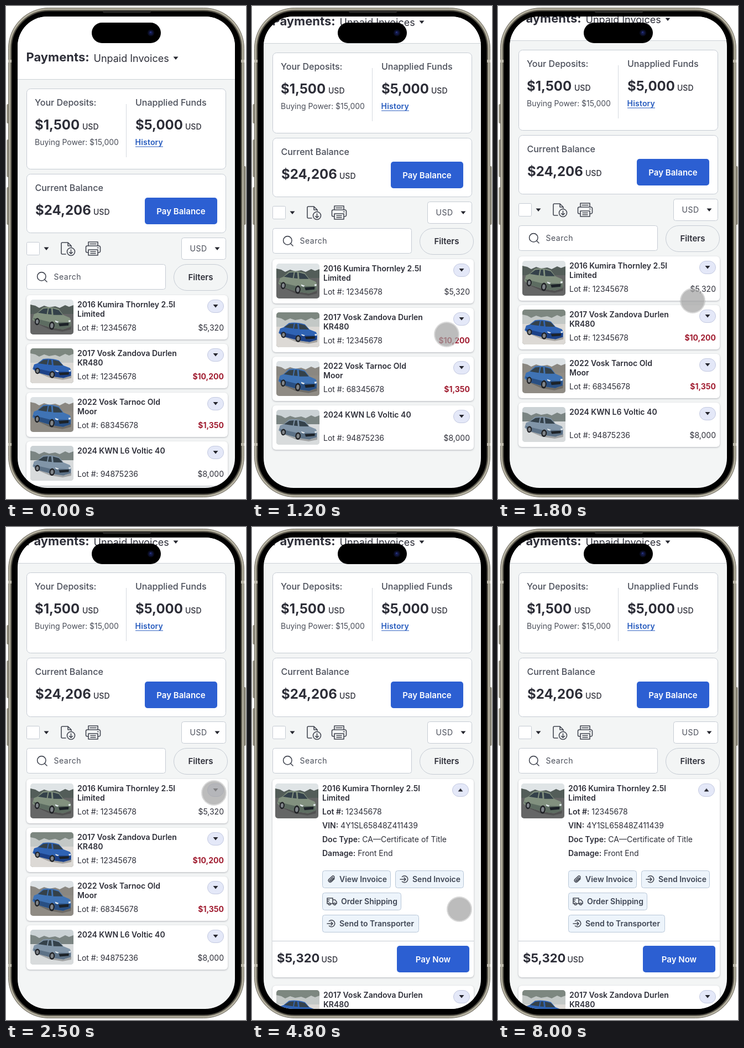
These frames come from a looping animation (434x890 px, 8.2 s). An HTML page:

```html
<!DOCTYPE html>
<html lang="en">
<head>
<meta charset="utf-8">
<title>Payments</title>
<style>
html, body { margin: 0; width: 100%; height: 100%; overflow: hidden; background: #fff; }
svg { display: block; }
text { font: 400 14px Inter, Roboto, sans-serif; fill: #2d2e38; white-space: pre; }
.label { font-size: 16px; font-weight: 500; fill: #4a4e59; }
.big { font-size: 24px; font-weight: 700; }
.total { font-size: 22px; font-weight: 700; }
.usd { font-weight: 500; }
.soft { fill: #4a4e59; }
.spaced { fill: #4a4e59; letter-spacing: .5px; }
.semi { font-weight: 600; }
.chip { font-weight: 600; fill: #3f4654; }
.due { font-weight: 700; fill: #a01c30; }
.btn { font-size: 15px; font-weight: 600; text-anchor: middle; }
.white { fill: #fff; }
.end { text-anchor: end; }
.panel { fill: #fff; stroke: #c5cbd3; }
.card { fill: #fff; filter: drop-shadow(0 1px 1.5px rgba(40, 45, 60, .32)); }
.icon { fill: none; stroke: #434752; stroke-width: 1.6; stroke-linecap: round; stroke-linejoin: round; }
.tri { fill: #25262e; }

.scroll, .cursor, .below, .head, .flip, .grow, .hide, .show {
  animation: 8200ms linear infinite;
}
.scroll { animation-name: scroll; }
.cursor { animation-name: move, fade; }
.below { animation-name: below; }
.head { animation-name: head; }
.grow { animation-name: grow; }
.hide { animation-name: hide; }
.show { animation-name: show; }
.flip { animation-name: flip; transform-box: fill-box; transform-origin: center; }

@keyframes scroll {
  0%, 3.6% { transform: translateY(0); animation-timing-function: ease-in-out; }
  14.63% { transform: translateY(-65px); }
  17.07%, 18.9% { transform: translateY(-67px); }
  21.95% { transform: translateY(-70px); animation-timing-function: ease-in-out; }
  29.27%, 100% { transform: translateY(-67px); }
}
@keyframes move {
  0%, 3.6% { transform: translate(352px, 658px); animation-timing-function: ease-in-out; }
  14.63% { transform: translate(352px, 593px); }
  17.07%, 18.9% { transform: translate(352px, 578px); }
  21.95% { transform: translate(352px, 532px); animation-timing-function: ease-in-out; }
  29.27% { transform: translate(376px, 483px); }
  30.49% { transform: translate(376px, 480px); }
  46.95% { transform: translate(375px, 480px); animation-timing-function: ease-in-out; }
  53.66%, 67.07% { transform: translate(375px, 690px); animation-timing-function: ease-in-out; }
  70.73%, 100% { transform: translate(375px, 780px); }
}
@keyframes fade {
  0%, .6% { opacity: 0; }
  3%, 89.3% { opacity: 1; }
  91.5%, 100% { opacity: 0; }
}
@keyframes below {
  0%, 31.8% { transform: translateY(0); animation-timing-function: ease-in-out; }
  37.8%, 100% { transform: translateY(285px); }
}
@keyframes head {
  0%, 31.8% { transform: translateX(0); animation-timing-function: ease-in-out; }
  37.8%, 100% { transform: translateX(-2px); }
}
@keyframes grow {
  0%, 31.8% { height: 80px; animation-timing-function: ease-in-out; }
  37.8%, 100% { height: 358px; }
}
@keyframes flip {
  0%, 31.8% { transform: rotate(0); }
  37.8%, 100% { transform: rotate(180deg); }
}
@keyframes hide {
  0%, 31.8% { opacity: 1; }
  35%, 100% { opacity: 0; }
}
@keyframes show {
  0%, 31.8% { opacity: 0; }
  37%, 100% { opacity: 1; }
}
</style>
</head>
<body>
<script>
const text = (x, y, cls, s) => `<text x="${x}" y="${y}" class="${cls}">${s}</text>`;
const rect = (x, y, w, h, r, attrs) =>
  `<rect x="${x}" y="${y}" width="${w}" height="${h}" rx="${r}" ${attrs}/>`;
const path = (d, attrs = 'class="icon"') => `<path d="${d}" ${attrs}/>`;
const fill = c => `fill="${c}"`;
const group = (attrs, ...parts) => `<g ${attrs}>${parts.join('')}</g>`;
const at = (x, y) => `transform="translate(${x} ${y})"`;
const caret = (x, y, cls = '') => path(`M${x - 4.5} ${y - 2.5}h9l-4.5 5.5z`, `class="tri ${cls}"`);

// Car pictures: colours, vertical shift and height factor
const cars = [
  { sky: '#dfe4e6', back: '#535d59', ground: '#656666', body: '#82917f', shade: '#5d6c61', dy: -1, k: 1 },
  { sky: '#7d8780', back: '#c3c8c6', ground: '#dcd9d5', body: '#2f63b4', shade: '#1c4187', dy: 6, k: .86 },
  { sky: '#dde2e5', back: '#8a8781', ground: '#8f8b84', body: '#3f73b5', shade: '#294f82', dy: -1, k: 1 },
  { sky: '#cbd2d5', back: '#7b8583', ground: '#d8dbdc', body: '#8195a8', shade: '#5c7186', dy: 4, k: .9 }
];

function photo(c) {
  const wheel = (x, y, rx, ry) =>
    `<ellipse cx="${x}" cy="${y}" rx="${rx}" ry="${ry}" fill="#202226"/>` +
    `<ellipse cx="${x}" cy="${y}" rx="${rx * .55}" ry="${ry * .6}" fill="#80858a"/>`;
  return group('clip-path="url(#thumb)"',
    rect(0, 0, 78, 64, 0, fill(c.sky)),
    path('M0 9L9 11 16 15 25 11 34 14 45 12 53 15 63 10 70 13 78 10V30H0z', fill(c.back)),
    rect(0, 26, 78, 38, 0, fill(c.ground)),
    group(`transform="translate(0 ${c.dy}) rotate(5 39 35) scale(1 ${c.k})"`,
      path('M5 44L38 52 64 52 75 46 75 52 60 57 36 55z', 'fill="#222" opacity=".3"'),
      path('M4 40L6 30 12 27 21 17Q34 13 50 17L59 27 71 31Q75 36 74 47L61 53 41 52 12 46z', fill(c.body)),
      path('M5 37L37 42 41 52 12 46zM44 41L73 39 74 47 61 53 45 52z', fill(c.shade)),
      path('M13 27L22 19 30 17.500 29 28zM32 17.500L36 17 38 28 31 28zM39 17L50 19 58 27 41 28.500z', fill('#34414a')),
      path('M52 43L70 40 70 45 54 48z', fill('#1c2228')),
      path('M45 38L52 40 50 42 46 41zM69 36L73 35 73 38 70 39z', fill('#e4eaee')),
      wheel(13, 43, 4.5, 6.500), wheel(40, 48, 5, 7.500)));
}

const pill = (y, cls = '') =>
  rect(364.5, y + 8.5, 29, 23, 11.5, 'fill="#e4e8f8" stroke="#c3c9e0"') + caret(379, y + 19.5, cls);

const head = (y, i, a, b, cls) =>
  group(at(44, y + 8), photo(cars[i])) +
  text(129, y + 22, 'semi', a) + text(129, y + 39, 'semi', b) + pill(y, cls);

const foot = (y, lot, price, cls = '') =>
  text(129, y + 64, '', 'Lot #: ' + lot) + text(394, y + 64, 'end ' + cls, price);

const row = (y, i, a, b, lot, price, cls) =>
  rect(37, y, 364, 80, 6, 'class="card"') + head(y, i, a, b) + foot(y, lot, price, cls);

const field = (y, name, value) =>
  `<text x="127" y="${y}"><tspan class="semi">${name}:</tspan> ${value}</text>`;

const chip = (x, y, w, tx, label, icon) =>
  rect(x + .5, y + .5, w - 1, 31, 4, 'fill="#edf4fb" stroke="#b8c7d8"') +
  group(at(x + 9, y + 8), icon) + text(tx, y + 21, 'chip', label);

const clip = path('M13 7L7.500 12.500a3.200 3.200 0 0 1-4.500-4.500L9 2.500a2.200 2.200 0 0 1 3.200 3.100L6.500 11a1 1 0 0 1-1.500-1.500L10 4.700');
const send = path('M3.500 3.500A6 6 0 1 1 3.500 12M0 8H10M7 5l3 3-3 3');
const truck = path('M2 12H0V2H10V12H6.500M10 5H14L17 8.500V12H15.500M10 12H11.500M0 5H4M0 8H3') +
  '<circle class="icon" cx="4.200" cy="12.500" r="1.800"/><circle class="icon" cx="13.500" cy="12.500" r="1.800"/>';

const blueButton = (x, y, label) =>
  rect(x, y, 131, 48, 5, fill('#2c5fd2')) + text(x + 65.5, y + 29.5, 'btn white', label);

const funds = [
  rect(37.5, 149.5, 360, 145, 7, 'class="panel"'),
  path('M217.500 177V273', 'stroke="#d5d9df"'),
  text(52, 180, 'label', 'Your Deposits:'),
  text(52, 223, 'big', '$1,500'), text(138, 223, 'usd', 'USD'),
  text(52, 251, 'soft', 'Buying Power: $15,000'),
  text(234, 180, 'label', 'Unapplied Funds'),
  text(234, 223, 'big', '$5,000'), text(324, 223, 'usd', 'USD'),
  '<text x="233.500" y="251" style="font-weight:600;fill:#2459bd;letter-spacing:.2px">History</text>',
  path('M234 254H284', 'stroke="#2459bd" stroke-width="1.200"'),
  rect(37.5, 303.5, 360, 106, 7, 'class="panel"'),
  text(52.5, 334, 'label', 'Current Balance'),
  text(53, 377, 'big', '$24,206'), text(158, 377, 'usd', 'USD'),
  blueButton(251, 346, 'Pay Balance')
].join('');

const tools = [
  rect(37.5, 426.5, 23, 23, 2, 'class="panel"'), caret(73, 438),
  path('M108 448H102a2 2 0 0 1-2-2V429a2 2 0 0 1 2-2H112L118 433V435M112 427V433H118'),
  '<circle class="icon" cx="117.500" cy="443.500" r="7"/>',
  path('M117.500 440V447M114.500 444.500L117.500 447.200 120.500 444.500'),
  path('M149 433V426H166V433M149 445H147a2.500 2.500 0 0 1-2.500-2.500V435.500A2.500 2.500 0 0 1 147 433H168a2.500 2.500 0 0 1 2.500 2.500V442.500A2.500 2.500 0 0 1 168 445H166M149 440H166V450H149zM153 443.500H162M153 446.800H162M152 429.500H163M165.500 436.500H167'),
  rect(317.5, 418.5, 80, 39, 4, 'class="panel"'),
  text(332.5, 443, 'spaced', 'USD'), caret(382, 438),
  rect(37.5, 466.5, 251, 45, 4, 'class="panel"'),
  '<circle class="icon" cx="64.300" cy="488.300" r="7.700"/>', path('M70 494L74 498'),
  text(86.5, 494, 'spaced', 'Search'),
  rect(303.5, 466.5, 97, 47, 23.5, 'fill="#f3f5f5" stroke="#c5cbd3"'),
  text(352, 495, 'btn', 'Filters')
].join('');

const details = [
  field(586, 'Lot #', '12345678'),
  field(611, 'VIN', '4Y1SL65848Z411439'),
  field(636, 'Doc Type', 'CA—Certificate of Title'),
  field(661, 'Damage', 'Front End'),
  chip(127, 687, 124, 158, 'View Invoice', clip),
  chip(259, 687, 124, 290, 'Send Invoice', send),
  chip(127, 727, 143, 161, 'Order Shipping', truck),
  chip(127, 767, 175, 158, 'Send to Transporter', send),
  path('M37 814.500H401', 'stroke="#c5cbd3"'),
  text(45, 853, 'total', '$5,320'), text(125.5, 853, 'usd', 'USD'),
  blueButton(262, 823, 'Pay Now')
].join('');

const content = group('class="scroll"',
  rect(0, -60, 434, 192, 0, fill('#fff')),
  path('M0 132.500H434', 'stroke="#ccd1d6"'),
  '<text x="36.500" y="100" style="font-size:22px;font-weight:700">Payments:</text>',
  '<text x="158.500" y="101" style="font-size:18px">Unpaid Invoices</text>',
  caret(307, 94),
  funds, tools,
  rect(37, 522, 364, 80, 6, 'class="card grow"'),
  group('class="head"', head(522, 0, '2016 Kumira Thornley 2.5l', 'Limited', 'flip')),
  group('class="hide"', foot(522, '12345678', '$5,320')),
  group('clip-path="url(#open)"', group('class="show"', details)),
  group('class="below"',
    row(610, 1, '2017 Vosk Zandova Durlen', 'KR480', '12345678', '$10,200', 'due'),
    row(698, 2, '2022 Vosk Tarnoc Old', 'Moor', '68345678', '$1,350', 'due'),
    row(786, 3, '2024 KWN L6 Voltic 40', '', '94875236', '$8,000')));

const metal = fill('#8b8778');
const phone = [
  rect(1.5, 177, 5, 35, 2, metal), rect(1.5, 241, 5, 68, 2, metal), rect(1.5, 327, 5, 68, 2, metal),
  rect(428, 289, 5.5, 106, 2, metal),
  rect(4.5, 3.5, 426, 883, 73, 'fill="#96927f" stroke="#77736a"'),
  rect(6.5, 5.5, 422, 879, 71, 'fill="none" stroke="#b9b5a6" stroke-width="2"'),
  rect(9.5, 8.5, 416, 873, 68, 'fill="#000" stroke="#4f4c44" stroke-width="2"'),
  [97, 789].map(y => rect(4, y, 6, 5, 0, fill('#bdb9ab')) + rect(425, y, 6, 5, 0, fill('#bdb9ab'))).join(''),
  rect(175, 8.5, 87, 4, 2, fill('#292827'))
].join('');

const island = rect(155, 30, 125, 37, 18.5, fill('#000')) +
  '<circle cx="262" cy="48.500" r="6" fill="#0a0d22"/><circle cx="262" cy="48.500" r="3.500" fill="#141a4a"/>' +
  '<circle cx="261.500" cy="47.500" r="1.300" fill="#2c3c8c"/>';

document.body.innerHTML = `<svg width="434" height="890" viewBox="0 0 434 890">
  <defs>
    <clipPath id="screen">${rect(21, 19, 393, 851, 54, '')}</clipPath>
    <clipPath id="thumb">${rect(0, 0, 78, 63, 5, '')}</clipPath>
    <clipPath id="open">${rect(37, 522, 364, 80, 6, 'class="grow"')}</clipPath>
  </defs>
  ${phone}
  ${group('clip-path="url(#screen)"', rect(21, 19, 393, 851, 0, fill('#f3f5f5')), content)}
  ${island}
  <g class="cursor">
    <circle r="22" fill="#a2a2a2" fill-opacity=".72"/>
    <circle r="21.500" fill="none" stroke="#fff" stroke-opacity=".5"/>
    <circle r="22.500" fill="none" stroke="#000" stroke-opacity=".16"/>
  </g>
</svg>`;
</script>
</body>
</html>
```
